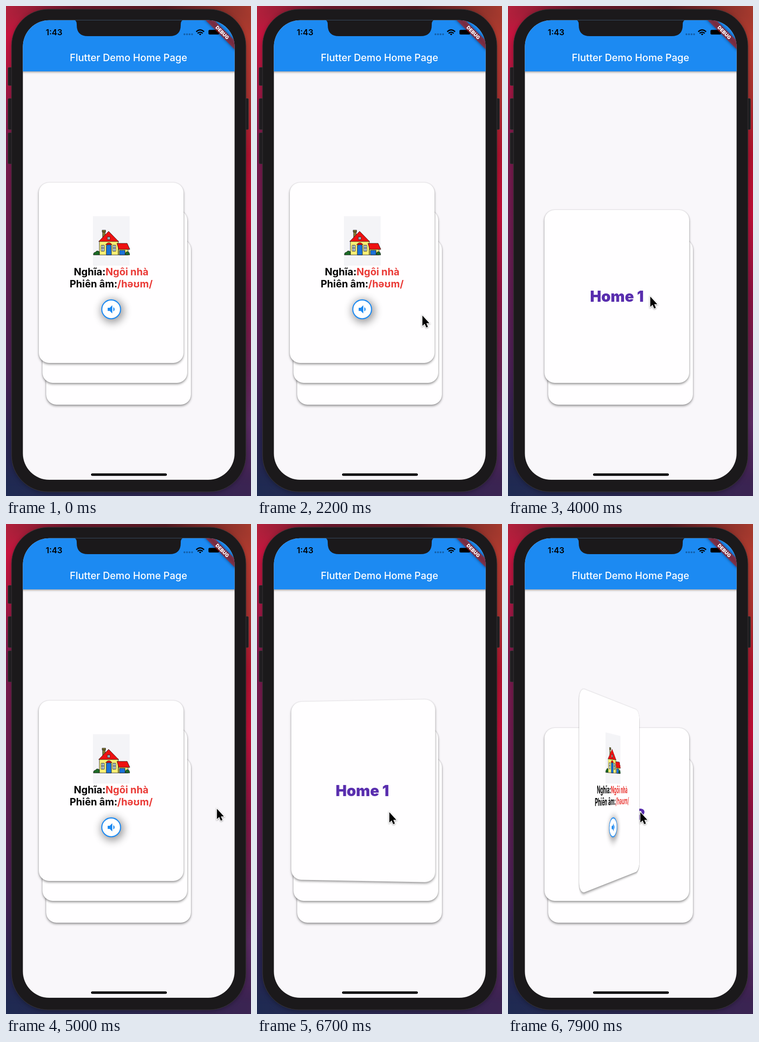
An HTML page for the animation above (8 s loop, 530 px wide and 1057 px high).

```html
<!DOCTYPE html>
<html lang="en">
<head>
<meta charset="utf-8">
<title>Flip cards</title>
<style>
  html, body { margin: 0; width: 100%; height: 100%; overflow: hidden; }
  body { position: relative; font-family: Inter, sans-serif; background: #1b191b; }
  svg { position: absolute; left: 0; top: 0; overflow: visible; }
  #wallpaper, #wallpaper div { position: absolute; inset: 0; }
  #wallpaper .left { right: 50%; background: linear-gradient(#b3203c, #c8143f 60px, #b8163f 120px, #7b1a4c 290px, #641d50 560px, #4a2054 780px, #2a2450 930px, #1f2a52); }
  #wallpaper .right { left: 50%; background: linear-gradient(#a03a2e, #b53a30 70px, #a93230 190px, #b0122f 320px, #bd1038 450px, #8a1340 620px, #66204f 780px, #5a2b62 900px, #38204e); }
  #wallpaper .top { bottom: auto; height: 60px; background: linear-gradient(90deg, #b3203c, #6c182c 28%, #551a22 65%, #a53a2e); mask-image: linear-gradient(#000 15px, transparent); }
  #wallpaper .bottom { top: auto; height: 60px; background: linear-gradient(90deg, #1f2a52, #2b2750 50%, #3b2452); mask-image: linear-gradient(transparent, #000 40px); }
  #screen { position: absolute; inset: 0; background: #f9f7fa; clip-path: inset(30.7px 35.5px 35px 36.5px round 57px); }
  #bar { position: absolute; left: 0; right: 0; top: 0; height: 141px; background: #1c8af2; box-shadow: 0 2px 4px rgba(0,0,0,.35); }
  .card { position: absolute; width: 313px; border-radius: 22px; background: #fffeff; box-shadow: 0 3px 5px rgba(0,0,0,.38), 0 0 3px rgba(0,0,0,.16); }
  .word { position: absolute; inset: 0; display: flex; align-items: center; justify-content: center; color: #592eae; font-weight: 900; font-size: 32.5px; white-space: pre; }
</style>
</head>
<body>
<div id="wallpaper"><div class="left"></div><div class="right"></div><div class="top"></div><div class="bottom"></div></div>

<svg width="530" height="1057">
  <g fill="#222023" stroke="#3a3638" stroke-width="1">
    <rect x="4.5" y="132.5" width="12" height="39" rx="2"/>
    <rect x="4.5" y="199.5" width="12" height="67" rx="2"/>
    <rect x="4.5" y="273.5" width="12" height="67" rx="2"/>
    <rect x="512" y="199.5" width="12.5" height="67" rx="2"/>
    <rect x="12" y="7" width="507" height="1041" rx="79" fill="#1b191b" style="filter:drop-shadow(0 2px 5px rgba(0,0,0,.3))"/>
  </g>
</svg>

<div id="screen">
  <div id="bar"></div>
  <div id="cards"></div>
  <svg width="530" height="1057">
    <path d="M144 29H387Q378 30 378 39V41Q378 65 354 65H177Q153 65 153 41V39Q153 30 144 29Z" fill="#1b191b"/>
    <text x="104" y="63" font-size="17.6" font-weight="600" text-anchor="middle">1:43</text>
    <text x="265" y="118.5" font-size="21.3" font-weight="500" fill="#fff" text-anchor="middle">Flutter Demo Home Page</text>
    <g fill="#145fa8">
      <circle cx="386" cy="61" r="2"/><circle cx="391.5" cy="61" r="2"/>
      <circle cx="397" cy="61" r="2"/><circle cx="402.5" cy="61" r="2"/>
    </g>
    <g fill="none" stroke="#000" stroke-width="2.6">
      <path d="M411.5 55.5Q420 47.5 428.5 55.5M414.5 59Q420 54 425.5 59"/>
      <path d="M417.3 60.5Q420 58.5 422.7 60.5L420 63.3Z" fill="#000" stroke="none"/>
    </g>
    <rect x="438" y="51.5" width="23" height="10" rx="2.5"/>
    <g transform="translate(494.5 30.7) rotate(45)">
      <rect x="-50" y="31" width="100" height="13.3" fill="#000" opacity=".5" style="filter:blur(3px)"/>
      <rect x="-50" y="31" width="100" height="13.3" fill="#b71c1c" opacity=".63"/>
      <text y="41.3" font-size="10.4" font-weight="900" fill="#fff" text-anchor="middle">DEBUG</text>
    </g>
    <rect x="184" y="1008.2" width="164" height="5.3" rx="2.65"/>
  </svg>
</div>

<svg id="cursor" width="20" height="30" style="filter:drop-shadow(0 1px 1.5px rgba(0,0,0,.4))">
  <path d="M.3 .8V23L5.2 18.4L8.7 26.4L12.3 24.9L8.9 17.2H15.4Z" stroke="#fff" stroke-width="2.6" paint-order="stroke"/>
</svg>

<template id="meaning">
  <svg width="313" height="389"><g transform="translate(-71 -381)">
    <rect x="188" y="453.5" width="79.5" height="106.5" fill="#f4f4f7"/>
    <g stroke="#111" stroke-width=".8" stroke-linejoin="round">
      <path d="M209 504V487H214.500V500ZM208 483.500H215.500V487.500H208Z" fill="#8a8034"/>
      <path d="M202 507H243V537H202ZM243 524H264V537H243Z" fill="#f8ef74"/>
      <path d="M222 486L243.500 508H200.500ZM240 512H262L268 525H244Z" fill="#ee1111"/>
      <path d="M217 537V517Q222.500 511 228 517V537ZM245.500 537V527H257.500V537Z" fill="#1a72d8"/>
      <path d="M215.500 515Q222.500 506 229.500 515Z" fill="#ee1111"/>
      <path d="M206 516H212.500V529H206ZM231 516H237.500V529H231ZM219.500 498H225V504H219.500Z" fill="#cfe6f5"/>
      <path d="M209.200 516V529M206 522H212.500M234.200 516V529M231 522H237.500M222.200 498V504" fill="none"/>
      <path d="M189 537Q189 531 194 531Q196 526 202 530V537ZM258 537Q258 530 262 530Q267 529 267.500 537Z" fill="#1c6a26"/>
    </g>
    <g font-size="21.4" font-weight="700" text-anchor="middle">
      <text x="227.5" y="581">Nghĩa:<tspan fill="#ea3a36">Ngôi nhà</tspan></text>
      <text x="227.5" y="606.5">Phiên âm:<tspan fill="#ea3a36">/həʊm/</tspan></text>
    </g>
    <circle cx="230" cy="658" r="25" opacity=".4" style="filter:blur(9px)"/>
    <circle cx="227.5" cy="654.3" r="20.3" fill="#fff" stroke="#1c8af2" stroke-width="2.3"/>
    <path transform="translate(214.4 641) scale(1.11)" fill="#1c8af2" d="M18.500 12c0-1.770-1.020-3.290-2.500-4.030v8.050c1.480-.730 2.500-2.250 2.500-4.020zM5 9v6h4l5 5V4L9 9H5z"/>
  </g></svg>
</template>

<script>
const LOOP = 8000, STEP = 100, FLIP = 500;
const DRAG = 4300, RELEASE = 4650, SETTLED = 4950;

// Resting places of the stacked cards, front to back: left, top, height
const slots = [[71, 381, 388.5], [79, 439.5, 373.5], [86.5, 503, 357]];

// Moments at which a tap turns the front card over; it begins on its back
const taps = [2600, 3750, 6217, 7583];

// Pointer stops: time, x, y
const stops = [
  [1700, 545, 790], [2100, 357.5, 667], [2250, 357.5, 667], [2550, 307.5, 626],
  [DRAG, 307.5, 626], [RELEASE, 456, 613.5], [5200, 456, 613.5], [5900, 286, 621], [LOOP, 286, 621]
];

const clamp = v => Math.min(1, Math.max(0, v));
const ease = v => v * v * (3 - 2 * v);
const mix = (a, b, k) => a + (b - a) * k;

const cursor = document.getElementById('cursor');
const cards = slots.map((_, i) => {
  const box = document.createElement('div');
  const word = document.createElement('div');
  box.className = 'card';
  word.className = 'word';
  box.append(word);
  document.getElementById('cards').prepend(box);
  return { box, word };
});
cards[0].box.append(document.getElementById('meaning').content.cloneNode(true));
const meaning = cards[0].box.querySelector('svg');

function pointerAt(t) {
  const n = stops.findIndex(s => s[0] > t);
  if (n < 1) return null;
  const [a, b] = [stops[n - 1], stops[n]];
  const k = ease((t - a[0]) / (b[0] - a[0]));
  return { x: mix(a[1], b[1], k), y: mix(a[2], b[2], k) };
}

// 0 = front, 1 = back
function turnAt(t) {
  return taps.reduce((turn, tap, i) => turn + (i % 2 ? 1 : -1) * clamp((t - tap) / FLIP), 1);
}

function place({ box }, [left, top, height]) {
  Object.assign(box.style, { left: left + 'px', top: top + 'px', height: height + 'px' });
}

function draw(t) {
  const pointer = pointerAt(t);
  cursor.style.display = pointer ? '' : 'none';
  if (pointer) cursor.style.transform = `translate(${pointer.x}px, ${pointer.y}px)`;

  const swiping = t >= DRAG && t < SETTLED;
  const leave = swiping ? clamp((t - RELEASE) / (SETTLED - RELEASE)) : 0;
  const first = t < SETTLED ? 0 : 1;

  cards.forEach((card, i) => {
    card.word.textContent = 'Home ' + (first + i);
    const to = slots[Math.max(0, i - 1)];
    place(card, slots[i].map((v, j) => mix(v, to[j], ease(leave))));
  });

  const turn = turnAt(t), isBack = turn > 0.5;
  const angle = isBack ? 180 * (1 - turn) : -180 * turn;
  let dx = 0, dy = 0;
  if (swiping) {
    const grab = pointerAt(DRAG), held = pointerAt(Math.min(t, RELEASE));
    dx = held.x - grab.x + 420 * leave * leave;
    dy = held.y - grab.y;
  }
  const front = cards[0];
  front.box.style.transform =
    `translate(${dx}px, ${dy}px) rotate(${dx * 0.04}deg) perspective(1107px) rotateY(${angle}deg)`;
  front.box.style.visibility = Math.abs(turn - 0.5) < 0.005 ? 'hidden' : '';
  front.word.style.display = isBack ? 'none' : '';
  meaning.style.display = isBack ? '' : 'none';
}

const start = performance.now();
function tick() {
  const t = (performance.now() - start) % LOOP;
  draw(Math.floor(t / STEP) * STEP);
  requestAnimationFrame(tick);
}
tick();
</script>
</body>
</html>
```
